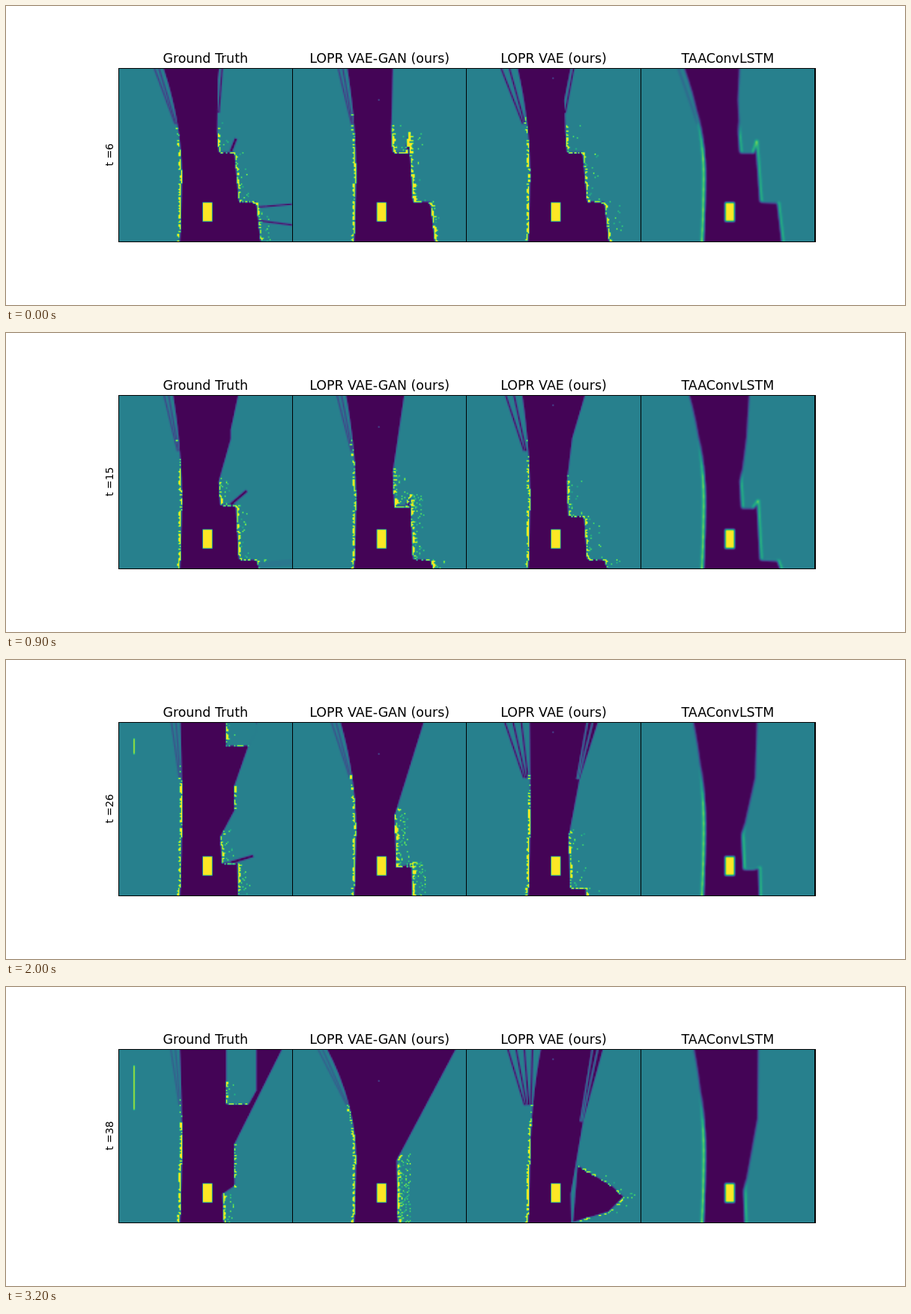
Write an HTML page with a canvas that moves like this. It is 1200 px wide and 400 px high and loops after 3.3 s.

```html
<!DOCTYPE html>
<html>
<head>
<meta charset="utf-8">
<style>
html, body { margin: 0; width: 100%; height: 100%; overflow: hidden; background: #fff }
canvas { display: block }
</style>
</head>
<body>
<canvas id="stage" width="1200" height="400"></canvas>
<script>
const N = 128, SIZE = 232.4, X0 = 150, Y0 = 83, K = N / SIZE;
const FREE = 2, UNKNOWN = 110, HIT = 255;

// left, right: road edge at the top at the start, middle and end of the loop.
// rate, floor: speed of the near wall and of the notch below it.
const panels = [
  { title: 'Ground Truth', left: [60, 83, 82], rate: 3.4, floor: 3.8,
    tip: 0, spread: 14, noise: [.45, .02], thick: 1, gap: 6, far: true },
  { title: 'LOPR VAE-GAN (ours)', left: [73, 70, 46], right: [134, 161, 218], rate: 2, floor: 4,
    tip: 26, spread: 17, noise: [.3, .08], thick: 2, gap: 6, bow: () => 0, dot: 23 },
  { title: 'LOPR VAE (ours)', left: [68, 79, 99], right: [139, 173, 182], rate: 3.4, floor: 5.5,
    tip: 0, spread: 20, noise: [.4, .01], thick: 1, gap: 11, bow: () => -5, dot: 7 },
  { title: 'TAAConvLSTM', left: [58, 70, 71], right: [132, 155, 157], rate: 3.2, floor: 4.2,
    tip: 16, gap: 8, bow: s => Math.min(8, .45 * s - 2), soft: true },
];

function makeCanvas(width, height) {
  const canvas = Object.assign(document.createElement('canvas'), { width, height });
  return canvas.getContext('2d', { willReadFrequently: true });
}
const ctx = document.getElementById('stage').getContext('2d');
const g = makeCanvas(N, N), field = makeCanvas(930, 232);

// Viridis, blended between nine stops.
const stops = [0x440154, 0x472d7b, 0x3b528b, 0x2c728e, 0x21918c, 0x28ae80, 0x5ec962, 0xaddc30, 0xfde725];
const viridis = Array.from({ length: 256 }, (_, v) => {
  const p = v / 255 * 8, i = Math.min(7, Math.floor(p));
  return [16, 8, 0].map(b => {
    const from = stops[i] >> b & 255, to = stops[i + 1] >> b & 255;
    return from + (to - from) * (p - i);
  });
});

const clamp = v => Math.max(0, Math.min(1, v));
const gray = v => `rgb(${v},${v},${v})`;
const track = ([a, b, c], s) => s < 16 ? a + (b - a) * s / 16 : b + (c - b) * (s - 16) / 16;

let seed = 1;
function rand() {
  seed = (Math.imul(seed, 1664525) + 1013904223) >>> 0;
  return seed / 2 ** 32;
}

function leftX(p, s, y) {
  const top = track(p.left, s), u = 1 - clamp(y / 150);
  return 85 + (top - 85) * u * u - 3 * (y / SIZE) ** 4;
}

function farWall(s) {
  const x = Math.min(155, 133 + 1.9 * s), y = 15 + 3.5 * s;
  return [[x + (.1 + .0125 * s) * y, 0], [x, y], [x, Math.max(y, 10 + 5.4 * s)]];
}

function rightEdge(p, s) {
  const x = 132 + .22 * s, y = 85 + p.rate * s, floor = 112 + p.floor * s, step = 178 + 4.6 * s;
  const top = p.far ? 0 : track(p.right, s);
  const upper = p.far ? farWall(s) : [[top, 0], [(top + x) / 2 + p.bow(s), y / 2]];
  const tip = p.tip * Math.max(0, 1 - s / 24);
  return [...upper, [x, y], [x + 2, floor], [150, floor], [155 + .2 * s, floor - tip],
    [161, step], [184, step + 1], [191, Math.max(240, step + 8)]];
}

function fill(points, value) {
  g.fillStyle = gray(value);
  g.beginPath();
  for (const [x, y] of points) g.lineTo(x * K, y * K);
  g.fill();
}

function line(x1, y1, x2, y2, value, width = 1.2) {
  g.strokeStyle = gray(value);
  g.lineWidth = width;
  g.beginPath();
  g.moveTo(x1 * K, y1 * K);
  g.lineTo(x2 * K, y2 * K);
  g.stroke();
}

// Streaks that run from the top beside an edge and close in on it.
function fan(top, x, y, gap, count, value) {
  for (let i = 1; i <= count; i++) line(top + gap * i, 0, x + gap * i * .25, y, value);
}

// Hits along an edge, with a thin scatter behind it.
function echoes(points, weight, p, side = 1, noise = 0) {
  for (let i = 0; i + 1 < points.length; i++) {
    const [x1, y1] = points[i], dx = points[i + 1][0] - x1, dy = points[i + 1][1] - y1;
    const n = Math.ceil(Math.hypot(dx, dy) * K);
    for (let j = 0; j < n; j++) {
      const x = (x1 + dx * j / n) * K, y = (y1 + dy * j / n) * K;
      const w = weight(y / K) * (Math.abs(dx) > Math.abs(dy) ? .5 : 1);
      g.fillStyle = gray(HIT);
      if (p.soft) {
        g.globalAlpha = w;
        g.fillRect(x - 1, y, 2, 1);
        g.globalAlpha = 1;
        continue;
      }
      const width = Math.round(1 + rand() * (side > 0 ? p.thick : 1));
      if (rand() < w) g.fillRect(Math.round(x) - (side < 0 ? width : 0), Math.round(y), width, 1);
      for (let k = noise * w; k > rand(); k--) {
        g.fillStyle = gray(160 + rand() * 95);
        g.fillRect(Math.round(x + rand() * p.spread * K), Math.round(y), 1, 1);
      }
    }
  }
}

function truthDetails(p, s) {
  const floor = 112 + p.floor * s, ray = 195 + 4.6 * s, block = 3.5 * (s - 11);
  if (s < 22) line(150, floor, Math.min(180, 157 + 1.6 * s), floor - 18 * clamp((24 - s) / 8), FREE, 2);
  if (s < 10)
    for (const d of [-1, 1]) line(187, ray + 9 * d, 232, ray + 1 + 14 * d, FREE + 11 * s, 1.2 + s / 3);
  if (s > 10) echoes(farWall(s).slice(1), () => .55, p);
  if (s > 17) {
    fill([[144, 0], [184, 0], [184, block - 18], [174, block], [144, block]], UNKNOWN);
    echoes([[144, block - 30], [144, block], [174, block]], () => .7, p, 1, .3);
    line(21, 22, 21, 43 + 3.2 * (s - 20), HIT, 1);
  }
}

function drawPanel(p, s) {
  const left = [], right = rightEdge(p, s);
  for (let y = 240; y >= 0; y -= 8) left.push([leftX(p, s, y), y]);
  const wallY = 85 + p.rate * s, vae = p.gap > 10;
  g.fillStyle = gray(UNKNOWN);
  g.fillRect(0, 0, N, N);
  fill([...right, ...left], FREE);
  if (vae && s > 21) {
    const x = 171 + 5.5 * (s - 25), y = 145 + 7.5 * (s - 25);
    const bulge = [[148, y - 42], [x - 15, y - 14], [x, y], [x - 20, y + 20], [142, y + 34]];
    fill(bulge, FREE);
    echoes(bulge, () => .65, p, 1, .3);
  }

  const count = vae ? 2 + Math.floor(s / 12) : p.soft ? +(s < 5) : 2;
  const shade = vae ? FREE : p.soft ? 80 : 45 + s;
  fan(track(p.left, s), leftX(p, s, 75), 75, -p.gap, count, shade);
  const [topX] = right[0], [midX, midY] = right[1];
  if ((p.far || vae) && s < 6) fan(topX, midX, Math.max(midY, 60), 4, 1, FREE);
  if (vae && s > 13) fan(topX, midX, midY, -7, 2, 100);

  echoes(left, y => .85 * clamp((y - 55) / 60), p, -1);
  if (!(vae && s > 21)) {
    const noise = p.soft ? 0 : p.noise[0] + p.noise[1] * s;
    echoes(right, y => (p.soft ? .6 : .8) * clamp((y - wallY + 15) / 20), p, 1, noise);
  }
  if (p.far) truthDetails(p, s);
  if (p.dot) {
    g.fillStyle = gray(70);
    g.fillRect(63, p.dot, 1, 1);
  }
  g.fillStyle = gray(HIT);
  g.fillRect(62, 99, 7, 14);
}

// Turns the gray field into colors.
function paintField() {
  const image = field.getImageData(0, 0, 930, 232), d = image.data;
  for (let i = 0; i < d.length; i += 4) {
    const [r, green, b] = viridis[d[i]];
    d[i] = r;
    d[i + 1] = green;
    d[i + 2] = b;
    d[i + 3] = 255;
  }
  ctx.putImageData(image, X0, Y0);
}

function draw(step) {
  ctx.fillStyle = '#fff';
  ctx.fillRect(0, 0, 1200, 400);
  panels.forEach((p, i) => {
    seed = (step * 4 + i + 1) * 7919;
    drawPanel(p, step);
    field.drawImage(g.canvas, i * SIZE, 0, SIZE, SIZE);
    if (p.soft) {
      field.filter = 'blur(1.3px)';
      field.drawImage(g.canvas, i * SIZE, 0, SIZE, SIZE);
      field.filter = 'none';
    }
  });
  paintField();

  ctx.fillStyle = '#000';
  ctx.textAlign = 'center';
  ctx.font = '17.4px "DejaVu Sans", sans-serif';
  panels.forEach((p, i) => {
    const x = Math.floor(X0 + i * SIZE);
    ctx.fillText(p.title, X0 + (i + .5) * SIZE, 76);
    ctx.fillRect(x, Y0, 1, 233);
  });
  ctx.fillRect(X0, Y0, 930, 1);
  ctx.fillRect(X0, Y0 + 232, 930, 1);
  ctx.fillRect(1079, Y0, 2, 233);
  ctx.save();
  ctx.translate(143, 199);
  ctx.rotate(-Math.PI / 2);
  ctx.font = '13.89px "DejaVu Sans", sans-serif';
  ctx.fillText('t =' + (step + 6), 0, 0);
  ctx.restore();
}

let shown = -1;
function tick() {
  const step = Math.floor(performance.now() % 3300 / 100);
  if (step !== shown) draw(shown = step);
  requestAnimationFrame(tick);
}
tick();
</script>
</body>
</html>
```
